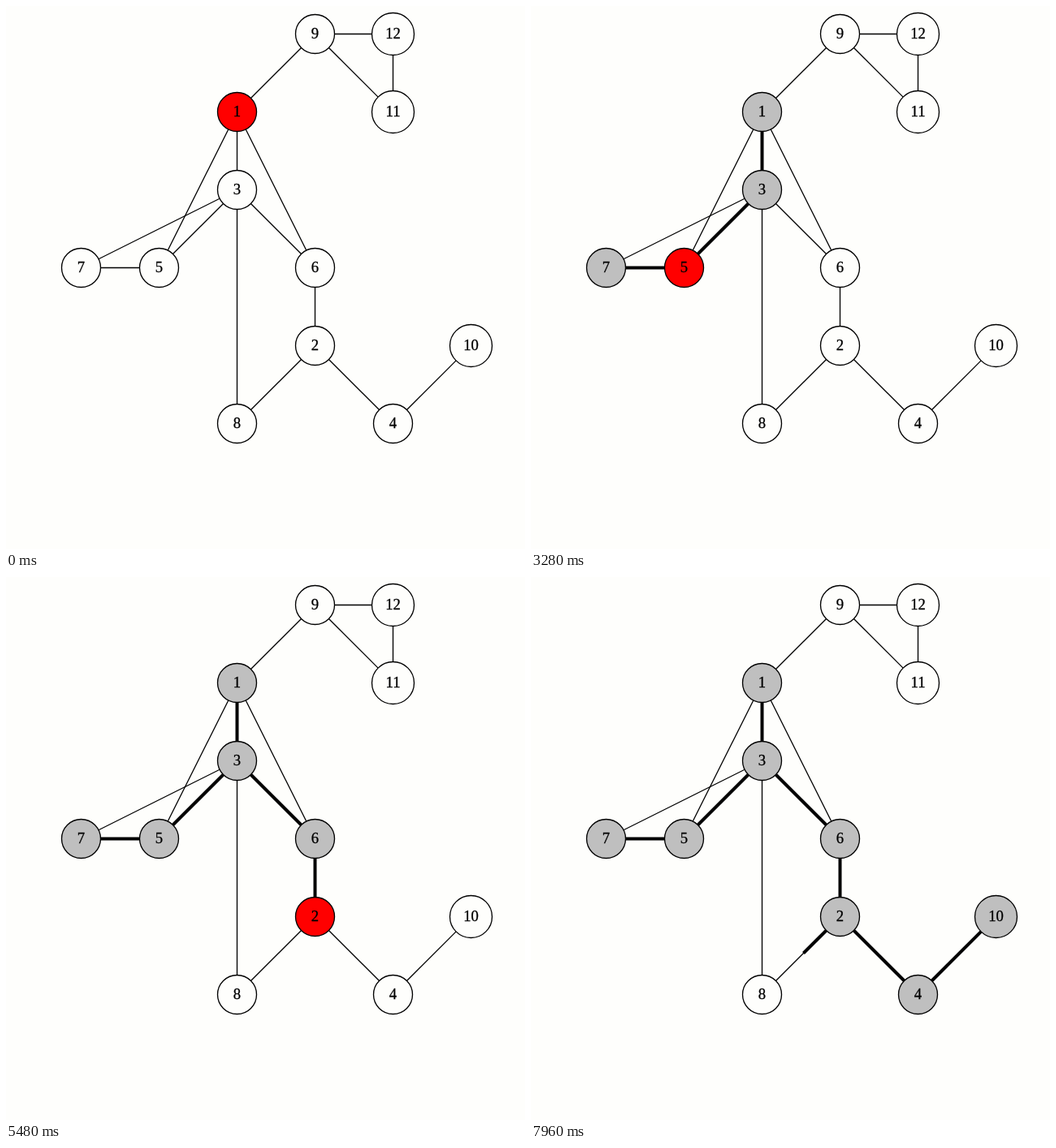
Animation of 639 by 669 pixels, one loop 8000 ms. Source, as an HTML page with a canvas:

```html
<!DOCTYPE html>
<html lang="en">
<head>
<meta charset="utf-8">
<title>Depth-first search</title>
<style>
  html, body { margin: 0; width: 100%; height: 100%; overflow: hidden; background: #fefefc; }
  canvas { display: block; }
</style>
</head>
<body>
<canvas id="stage" width="639" height="669"></canvas>
<script>
const ctx = document.getElementById('stage').getContext('2d');
const LOOP = 8000, TICK = 40, LEAD = 140;
const GROW = 628, PAUSE = 320, QUICK = 110;
const PAPER = '#fefefc', VISITED = '#bfbfbf', CURRENT = '#ff0000';
const GRID = 96, THIN = 1.33, THICK = 4;

// Nodes and edges are written with hexadecimal digits: A is node 10.
const layout = [
  '...9C.',
  '..1.B.',
  '..3...',
  '75.6..',
  '...2.A',
  '..8.4.'
];
const edges = '13 15 16 19 35 36 37 38 57 62 24 28 4A 9B 9C BC'.split(' ');

const nodes = {};
layout.forEach((line, row) => [...line].forEach((id, col) => {
  if (id === '.') return;
  const label = parseInt(id, 16);
  nodes[id] = { label, x: 92.5 + GRID * col, y: 34.5 + GRID * row, r: label > 9 ? 26 : 24 };
}));

const neighbours = id => edges.filter(edge => edge.includes(id))
  .map(edge => edge.replace(id, '')).sort();

// Depth-first walk: a step either makes a node current or grows an edge.
const walk = [], seen = new Set();
function explore(id, depth = 0) {
  seen.add(id);
  walk.push({ node: id, time: PAUSE });
  for (const next of neighbours(id)) {
    if (seen.has(next)) continue;
    walk.push({ from: id, to: next, time: GROW });
    explore(next, depth + 1);
    walk.push({ node: id, time: depth > 2 ? QUICK : PAUSE });
  }
}
explore('1');

function drawEdge(from, to, width, part = 1) {
  const a = nodes[from], b = nodes[to];
  const dx = b.x - a.x, dy = b.y - a.y, length = Math.hypot(dx, dy);
  const start = a.r / length;
  const end = start + (1 - start - b.r / length) * part;
  ctx.lineWidth = width;
  ctx.beginPath();
  ctx.moveTo(a.x + dx * start, a.y + dy * start);
  ctx.lineTo(a.x + dx * end, a.y + dy * end);
  ctx.stroke();
}

function drawNode({ label, x, y, r }, fill) {
  ctx.lineWidth = THIN;
  ctx.fillStyle = fill;
  ctx.beginPath();
  ctx.arc(x, y, r, 0, 2 * Math.PI);
  ctx.fill();
  ctx.stroke();
  ctx.fillStyle = '#000';
  ctx.lineWidth = 0.3;
  ctx.fillText(label, x, y + 5.5);
  ctx.strokeText(label, x, y + 5.5);
}

function draw(time) {
  ctx.fillStyle = PAPER;
  ctx.fillRect(0, 0, 639, 669);
  ctx.strokeStyle = '#000';
  ctx.font = '18.67px "Liberation Serif", serif';
  ctx.textAlign = 'center';
  for (const [a, b] of edges) drawEdge(a, b, THIN);

  const fills = {};
  let elapsed = time + LEAD;
  for (const step of walk) {
    if (elapsed < 0) break;
    if (step.node) fills[step.node] = elapsed < step.time ? CURRENT : VISITED;
    else drawEdge(step.from, step.to, THICK, Math.min(1, elapsed / step.time));
    elapsed -= step.time;
  }
  for (const id in nodes) drawNode(nodes[id], fills[id] || PAPER);
}

const origin = performance.now();
function frame() {
  const time = (performance.now() - origin) % LOOP;
  draw(Math.floor(time / TICK) * TICK);
  requestAnimationFrame(frame);
}
frame();
</script>
</body>
</html>
```
